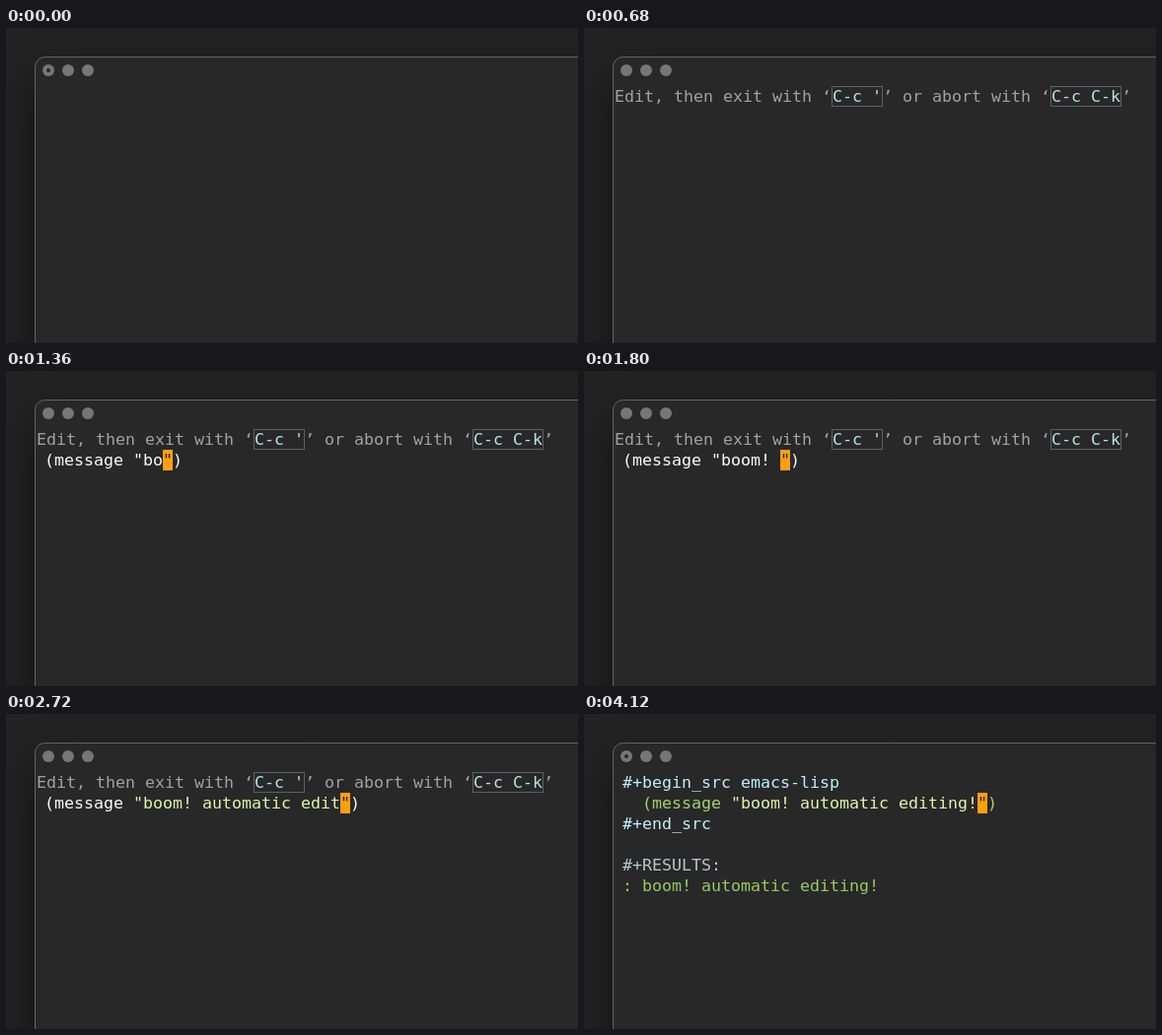
An HTML page with a canvas that plays this animation: 580 px wide and 320 px high, repeating every 4160 ms.

```html
<!DOCTYPE html>
<html lang="en">
<head>
<meta charset="utf-8">
<title>Automatic editing</title>
<style>
  html, body { margin: 0; width: 100%; height: 100%; overflow: hidden; background: #222; }
  canvas { display: block; }
</style>
</head>
<body>
<canvas id="stage" width="580" height="320"></canvas>
<script>
const ctx = document.getElementById('stage').getContext('2d');
const LOOP = 4160, CELL = 10, ROW = 21, LEFT = 39, TOP = 59;
const FONT = '16.61px "DejaVu Sans Mono", monospace';
const color = {
  bg: '#282828', white: '#fbfbfb', header: '#a2a2a2', key: '#b5e3ea', keyBox: '#5d6262',
  cursor: '#ff9f0f', bar: '#3e4c55', selected: '#ff9c54', string: '#dcf6a6',
  code: '#a3d36c', block: '#c0effb', results: '#b9c7cd', output: '#98ca60'
};

const colX = col => LEFT + col * CELL;
const rowY = row => TOP + row * ROW;
const latest = (list, t) => list.findLast(item => item[0] <= t);
const within = (t, from, to) => t >= from && t < to;

function textAt(str, x, row, fill, bold = false) {
  ctx.font = (bold ? 'bold ' : '') + FONT;
  ctx.fillStyle = fill;
  ctx.fillText(str, x, rowY(row) + 16);
}
const text = (str, col, row, fill, bold) => textAt(str, colX(col), row, fill, bold);

function cursor(col, row, char = '') {
  ctx.fillStyle = color.cursor;
  ctx.fillRect(colX(col), rowY(row), CELL, ROW);
  text(char, col, row, color.bg);
}

function circle(x, y, r, fill) {
  ctx.fillStyle = fill;
  ctx.beginPath();
  ctx.arc(x, y, r, 0, 2 * Math.PI);
  ctx.fill();
}

function drawWindow(modified) {
  ctx.fillStyle = '#232323';
  ctx.fillRect(0, 0, 580, 320);
  ctx.save();
  ctx.shadowColor = 'rgba(0,0,0,.55)';
  ctx.shadowBlur = 42;
  ctx.shadowOffsetY = 20;
  ctx.beginPath();
  ctx.roundRect(29.5, 29.5, 700, 500, 10);
  ctx.fillStyle = color.bg;
  ctx.fill();
  ctx.restore();
  ctx.strokeStyle = '#646464';
  ctx.lineWidth = 1;
  ctx.stroke();
  for (const x of [43, 63, 83]) circle(x, 43, 6, '#767676');
  if (modified) circle(43, 43, 2, '#252525');
}

// Completion list under the cursor line; the shared prefix is set in regular weight.
function drawPopup({ col, row, width, common, items }) {
  const x = colX(col) + 1;
  ctx.fillStyle = color.bar;
  ctx.fillRect(x - CELL, rowY(row) + 1, width * CELL, ROW);
  items.forEach((item, i) => {
    const fill = i ? color.white : color.selected;
    const prefix = item.startsWith(common) ? common : '';
    textAt(prefix, x, row + i, fill);
    textAt(item.slice(prefix.length), x + prefix.length * CELL, row + i, fill, prefix !== '');
  });
}

function drawKey(str, x) {
  ctx.strokeStyle = color.keyBox;
  ctx.strokeRect(x + .5, TOP + .5, str.length * CELL + 1, ROW - 1);
  textAt(str, x + 1, 0, color.key);
}

function drawHeader() {
  textAt('Edit, then exit with ‘', 31, 0, color.header);
  drawKey("C-c '", 251);
  textAt('’ or abort with ‘', 303, 0, color.header);
  drawKey('C-c C-k', 473);
  textAt('’', 545, 0, color.header);
}

// Typing: keystroke times, one character each.
const strokes = (str, times) => times.map((time, i) => [time, str.slice(0, i + 1)]);
const functionName = strokes('(message ', [720, 760, 800, 840, 880, 920, 1000, 1040, 1120]);
const message = 'boom! automatic editing!';
const stringBody = [[1280, ''], ...strokes(message, [
  1320, 1360, 1480, 1640, 1680, 1800,
  1880, 1920, 1960, 2000, 2040, 2080, 2120, 2200, 2320,
  2360, 2400, 2440, 2480, 2520, 2760, 2800, 2840, 3000
])];

const messageItems = ['', '--alter-repeat-address', '--bbdb-query-with-words', '--cache-encoded',
  '--check-continuation-headers', '--default-send-mail-function', '--fold-long-headers',
  '--in-tocc-p', '--name-table', '--rotate-fixnum-left'].map(end => 'message' + end);

const popups = [
  { from: 120, to: 320, col: 1, row: 1, width: 18, common: '',
    items: ['awk', 'C', 'calc', 'css', 'dot', 'emacs-lisp', 'java', 'js', 'python', 'shell'] },
  { from: 320, to: 480, col: 1, row: 1, width: 18, common: 'e', items: ['emacs-lisp'] },
  { from: 840, to: 1120, col: 1, row: 2, width: 42, common: 'message', items: messageItems },
  { from: 1400, to: 1480, col: 10, row: 2, width: 34, common: 'bo',
    items: ['bool-vector-count-consecutive', 'bool-vector-count-population'] },
  { from: 1960, to: 2040, col: 16, row: 2, width: 21, common: 'auto', items: ['auto-save-file-name'] },
  { from: 2480, to: 2560, col: 26, row: 2, width: 24, common: 'edit',
    items: ['edit-abbrevs', 'edit-abbrevs-mode-hook', 'edit-kbd-macro', 'edit-last-kbd-macro'] }
];

function drawBlock(row) {
  text('#+begin_src emacs-lisp', 0, row, color.block);
  text('#+end_src', 0, row + 2, color.block);
}

function drawTemplate(t) {
  if (t >= 480) {
    drawBlock(0);
    cursor(2, 1);
  } else if (t >= 80) {
    const typed = t >= 360 ? '<em' : t >= 160 ? '<e' : '<';
    text(typed, 0, 0, color.white);
    cursor(typed.length, 0);
  }
}

function drawEditor(t) {
  drawHeader();
  const body = latest(stringBody, t);
  const name = latest(functionName, t);
  if (body) {
    const quoted = '"' + body[1], end = 9 + quoted.length;
    text('(message', 0, 1, color.white);
    text(quoted, 9, 1, t >= 2720 ? color.string : color.white);
    cursor(end, 1, '"');
    text(')', end + 1, 1, color.white);
  } else if (name) {
    text(name[1] + ')', 0, 1, color.white);
    cursor(name[1].length, 1, ')');
  } else if (t < 680) {
    cursor(0, 1);
  }
}

function drawResult(t) {
  drawBlock(0);
  text('(message', 2, 1, color.code);
  text(`"${message}"`, 11, 1, color.string);
  text(')', 37, 1, color.code);
  if (!within(t, 3840, 4040)) cursor(36, 1, '"');
  if (t >= 3480) {
    text('#+RESULTS:', 0, 4, color.results);
    text(': ' + message, 0, 5, color.output);
  }
}

function draw(t) {
  const editing = within(t, 520, 3240);
  drawWindow(!editing);
  if (editing) drawEditor(t);
  else if (t < 520) drawTemplate(t);
  else drawResult(t);
  popups.filter(p => within(t, p.from, p.to)).forEach(drawPopup);
}

const start = performance.now();
function tick() {
  draw((performance.now() - start) % LOOP);
  requestAnimationFrame(tick);
}
tick();
</script>
</body>
</html>
```
